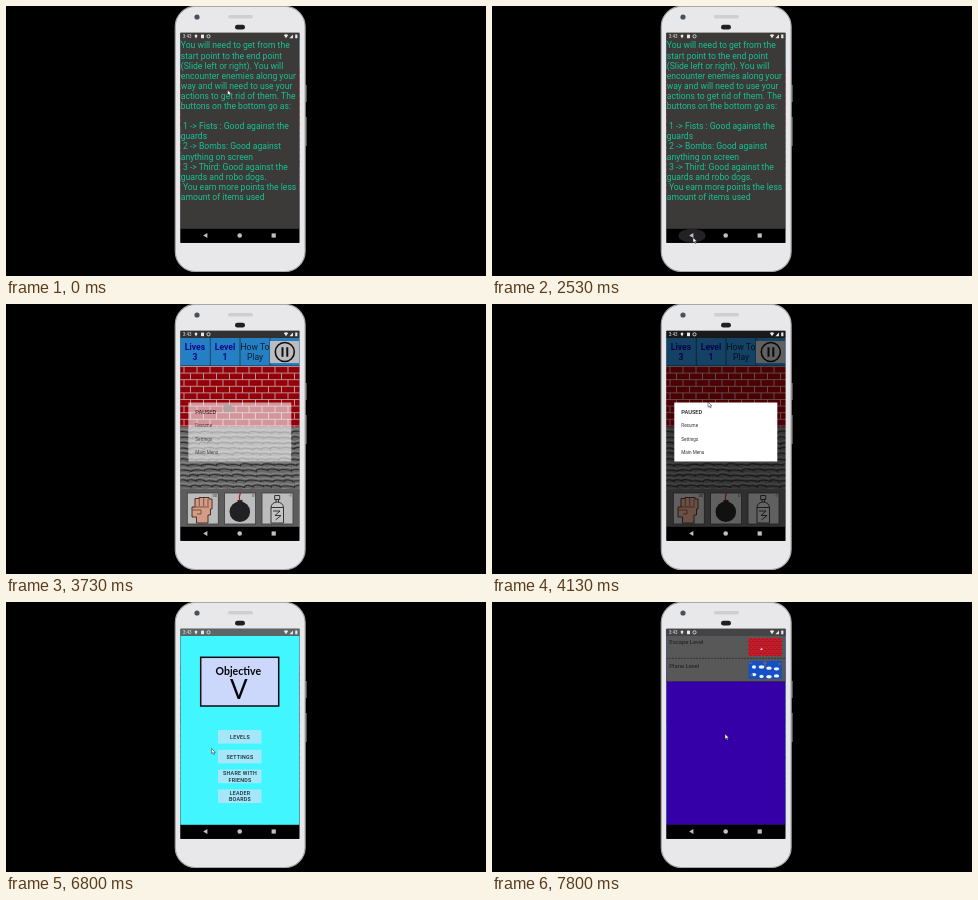
An HTML page that plays this animation: 480x270 px, repeating every 7.99 s.

```html
<!DOCTYPE html>
<html lang="en">
<head>
<meta charset="utf-8">
<title>Phone game walkthrough</title>
<style>
html, body { margin: 0; width: 100%; height: 100%; overflow: hidden; background: #000; }
svg { display: block; width: 100%; height: 100%; }
text { font-family: Roboto, "Open Sans", sans-serif; white-space: pre; }
.mid { text-anchor: middle; }
.bold { font-weight: 700; }
.help { font-size: 8.6px; fill: #14c493; }
.head { font-size: 8.6px; }
.count { font-size: 4px; fill: #333; text-anchor: end; }
.item { font-size: 4.65px; fill: #333; }
.btn { font-size: 5.3px; font-weight: 500; letter-spacing: .05em; fill: #14242c; text-anchor: middle; }
.title { font-family: Lato, sans-serif; text-anchor: middle; fill: #050508; }
.row { font-size: 5.9px; fill: #1c1c1c; }
</style>
</head>
<body>
<svg viewBox="0 0 480 270">
  <defs>
    <clipPath id="screenClip"><rect x="174.5" y="27" width="118.8" height="196"/></clipPath>
    <clipPath id="itemClip"><rect x="182.5" y="141" width="103" height="14"/></clipPath>
    <pattern id="bricks" x="175" y="62" width="13" height="13.2" patternUnits="userSpaceOnUse">
      <rect width="13" height="13.2" fill="#a8000a"/>
      <path d="M0 .5H13M0 7.1H13M3 .5V7.1M9.5 7.1V13.2" stroke="#d8b4b4" stroke-width=".9"/>
    </pattern>
    <pattern id="smallBricks" x="256" y="36" width="4" height="4" patternUnits="userSpaceOnUse">
      <rect width="4" height="4" fill="#b80a1a"/>
      <path d="M0 .2H4M0 2.2H4M1 0V2M3 2V4" stroke="#cc5058" stroke-width=".35"/>
    </pattern>
  </defs>

  <rect width="480" height="270"/>
  <g id="phone">
    <path d="M300 79V96M300 111V140" stroke="#a4a4a8" stroke-width="1"/>
    <rect x="169.3" y=".5" width="129.8" height="265" rx="20" fill="#e8e8ea" stroke="#a8a8ac" stroke-width="1.2"/>
    <rect x="222" y="9" width="25" height="3.4" rx="1.7" fill="#cfcfd2"/>
    <circle cx="191" cy="11" r="2.6" fill="#4a505c"/>
    <rect x="229" y="18.8" width="10" height="4.8" rx="2.4" fill="#202022"/>
    <rect x="174.5" y="26.7" width="118.8" height="210.1"/>
  </g>

  <g clip-path="url(#screenClip)">
    <g id="game">
      <rect x="174" y="27" width="120" height="7" fill="#383838"/>
      <rect x="174" y="34" width="120" height="28" fill="#2a92de"/>
      <path d="M204.3 34V62M234 34V62M264 34V62M174 61.8H294" stroke="#17415f" stroke-width=".8"/>
      <g class="mid head">
        <g class="bold" fill="#1008a0">
          <text x="189" y="46.3">Lives</text><text x="189" y="56.3">3</text>
          <text x="219" y="46.3">Level</text><text x="219" y="56.3">1</text>
        </g>
        <g fill="#0b2036"><text x="249" y="46.3">How To</text><text x="249" y="56.3">Play</text></g>
      </g>
      <rect x="264" y="37" width="29" height="22" fill="#d6d6d8"/>
      <circle cx="278.8" cy="48" r="9.5" fill="none" stroke="#111" stroke-width="1.6"/>
      <path d="M276.5 43.2V52.8M281.3 43.2V52.8" stroke="#111" stroke-width="2"/>
      <rect x="174" y="62" width="120" height="61" fill="url(#bricks)"/>
      <rect x="174" y="123" width="120" height="100" fill="#747474"/>
      <g id="stones" fill="none"></g>
      <rect x="174" y="185" width="120" height="38" fill="#6a6a6a"/>
      <g id="cards"></g>
      <path d="M189 194.5H193V193.500H203V195H206V205H204.500V211H202V219H190.500V213H186V203H189Z" fill="#efb298" stroke="#4a2418" stroke-width=".9"/>
      <path d="M193.300 194V202M197.700 194V202M202 195V202M189 203H203M186.500 206H195V210H191" fill="none" stroke="#7a4432" stroke-width=".8"/>
      <circle cx="233.800" cy="207.800" r="10.300" fill="#262628"/>
      <rect x="231.500" y="196" width="5" height="3" fill="#262628"/>
      <path d="M234 197Q232.500 193.500 234.500 189" fill="none" stroke="#c8202a" stroke-width="1.200"/>
      <path d="M265 219V203.500Q265.500 198.500 271.200 198Q277 198.500 277.500 203.500V219Z" fill="#dedede" stroke="#2a2a2c" stroke-width=".9"/>
      <path d="M268.700 191.500H273.700V195.500H268.700ZM270 195.500V198M272.500 195.500V198M265 203.500H277.500M267 207H274L269 211.500H275L269.500 216" fill="none" stroke="#2a2a2c" stroke-width=".9"/>
      <g class="count"><text x="211" y="193.300">00</text><text x="248.500" y="193.300">0</text><text x="286" y="193.300">-1</text></g>
    </g>

    <rect id="dim" x="174" y="27" width="120" height="196"/>
    <g id="dialog">
      <rect x="182.300" y="98.500" width="103" height="59" fill="#fff"/>
      <circle id="ripple" clip-path="url(#itemClip)" fill="#dedede"/>
      <text x="189.300" y="109.900" font-size="5.700" font-weight="500" fill="#1c1c1c">PAUSED</text>
      <g class="item">
        <text x="189.300" y="122.900">Resume</text>
        <text x="189.300" y="136.500">Settings</text>
        <text x="189.300" y="150.300">Main Menu</text>
      </g>
    </g>

    <g id="help"><rect x="174" y="27" width="120" height="196" fill="#3c3939"/></g>

    <g id="menu">
      <rect x="174" y="27" width="120" height="196" fill="#42f6ff"/>
      <rect x="174" y="27" width="120" height="7" fill="#5c6668"/>
      <rect x="194.700" y="55.300" width="78" height="48.700" fill="#ccd8fb" stroke="#0a0a10" stroke-width="1.500"/>
      <text class="title bold" x="232.300" y="72.500" font-size="10.500">Objective</text>
      <text class="title" x="232.700" y="96.500" font-size="26">V</text>
    </g>

    <g id="levels">
      <rect x="174" y="27" width="120" height="196" fill="#3600a8"/>
      <rect x="174" y="27" width="120" height="7" fill="#444"/>
      <rect x="174" y="34" width="120" height="45.500" fill="#585858"/>
      <path d="M174 56.300H294M174 79.500H294M174 222.500H294" stroke="#25252c" stroke-width=".7" stroke-dasharray="2 1"/>
      <text class="row" x="177.300" y="42.200">Escape Level</text>
      <text class="row" x="177.300" y="65.500">Plane Level</text>
      <rect x="256.500" y="36" width="33.300" height="18" fill="url(#smallBricks)"/>
      <path d="M268 48L269.500 45.500L271 48Z" fill="#c8c8d0"/>
      <rect x="256.500" y="59" width="33.300" height="18" fill="#1450c8"/>
      <g id="clouds" fill="#eef4ff"></g>
      <path d="M271 61H275M273 59V66M257 61H260M286 62H289M258 73H261" stroke="#5c6678" stroke-width="1.300"/>
    </g>
  </g>

  <g id="status" fill="#e8e8e8">
    <text x="176.800" y="32.300" font-size="4.500">3:43</text>
    <path d="M190 28.500A1.400 1.400 0 0 1 191.400 30L190 32.400L188.600 30A1.400 1.400 0 0 1 190 28.500"/>
    <rect x="195" y="28.600" width="3" height="3.600"/>
    <circle cx="202.500" cy="30.300" r="1.600" fill="none" stroke="#ddd" stroke-width=".9"/>
    <path d="M277.800 29Q280 27.500 282.200 29L280 32.300ZM287 28.400V32.300H283.400ZM289.200 28.400H291.400V32.300H289.200Z"/>
  </g>

  <rect x="174.500" y="222.800" width="118.800" height="14"/>
  <ellipse id="press" cx="200" cy="229.700" fill="#222224"/>
  <g fill="#c0c0c0">
    <path d="M197.200 229.500L201.400 227.100V231.900Z"/>
    <circle cx="233.700" cy="229.500" r="2.300"/>
    <rect x="265.600" y="227.400" width="4.200" height="4.200"/>
  </g>
  <ellipse id="smear" cx="222" cy="104" rx="5" ry="3.800" fill="#a8a4a4"/>
  <path id="cursor" d="M0 0V5.200L1.300 4.100L2.200 6L3.100 5.600L2.300 3.800H3.900Z" fill="#fff" stroke="#222" stroke-width=".5"/>
</svg>
<script>
const LOOP = 7990, STEP = 200 / 3;
const $ = id => document.getElementById(id);

function add(parent, tag, attrs, label) {
  const el = document.createElementNS('http://www.w3.org/2000/svg', tag);
  for (const k in attrs) el.setAttribute(k, attrs[k]);
  if (label) el.textContent = label;
  parent.appendChild(el);
  return el;
}

let seed = 7;
const rand = () => (seed = (seed * 16807) % 2147483647) / 2147483647;

function buildHelp() {
  const lines = [
    'You will need to get from the', 'start point to the end point',
    '(Slide left or right). You will', 'encounter enemies along your',
    'way and will need to use your', 'actions to get rid of them. The',
    'buttons on the bottom go as:', '',
    ' 1 -> Fists : Good against the', 'guards', ' 2 -> Bombs: Good against',
    'anything on screen', ' 3 -> Third: Good against the', 'guards and robo dogs.',
    ' You earn more points the less', 'amount of items used'];
  lines.forEach((s, i) =>
    add($('help'), 'text', { class: 'help', x: 174.8, y: 42.4 + i * 10.1 }, s));
}

// Each stone is a lit upper edge over a dark gap
function buildStones() {
  for (let y = 126; y < 186; y += 5.4) {
    for (let x = 170 + rand() * 4; x < 294;) {
      const w = 8 + rand() * 7, top = y + rand() * 1.2;
      const arc = dy => `M${x} ${top + dy}q${w * .15} -1.6 ${w * .5} -1.2t${w * .5} 1.4`;
      add($('stones'), 'path', { d: arc(0), stroke: '#969696', 'stroke-width': 1.3 });
      add($('stones'), 'path', { d: arc(2.3) + 'v-2', stroke: '#363636', 'stroke-width': 1.1 });
      x += w;
    }
  }
}

function buildCards() {
  for (const x of [181.3, 218.6, 256])
    add($('cards'), 'rect', { x, y: 189, width: 31, height: 31, fill: '#d6d6d6', stroke: '#444', 'stroke-width': .8 });
}

function buildMenu() {
  [['LEVELS'], ['SETTINGS'], ['SHARE WITH', 'FRIENDS'], ['LEADER', 'BOARDS']].forEach((words, i) => {
    const mid = 134.8 + i * 19.8;
    add($('menu'), 'rect', { x: 212, y: mid - 6.8, width: 43.5, height: 13.6, fill: '#a4e6fa' });
    words.forEach((s, j) => add($('menu'), 'text',
      { class: 'btn', x: 234, y: mid + 1.9 + (j - (words.length - 1) / 2) * 6.5 }, s));
  });
}

function buildClouds() {
  for (let i = 0; i < 8; i++)
    add($('clouds'), 'ellipse', { cx: 262 + (i % 4) * 7.5, cy: 64 + Math.floor(i / 4) * 8 + rand() * 3, rx: 2 + rand(), ry: 1.7 });
}

const clamp = v => Math.max(0, Math.min(1, v));
const ramp = (t, a, b) => clamp((t - a) / (b - a));
const ease = p => p * p * (3 - 2 * p);

// time, x, y of the pointer tip
const path = [
  [0, 221.5, 84], [800, 209.5, 215], [1333, 205, 226], [1667, 205, 226],
  [2400, 201, 231.5], [2800, 201, 231.5], [3267, 282, 58], [3467, 279, 54],
  [3730, 279, 54], [3733, 220, 100], [4133, 216, 98], [4467, 216, 138],
  [5000, 216, 138], [5800, 205.5, 146.5], [6900, 205.5, 146.5],
  [7333, 233, 132], [LOOP, 233, 132]];

function pointer(t) {
  const i = Math.max(1, path.findIndex(k => k[0] >= t));
  const [a, b] = [path[i - 1], path[i]];
  const p = ease(ramp(t, a[0], b[0]));
  return [a[1] + (b[1] - a[1]) * p, a[2] + (b[2] - a[2]) * p];
}

const set = (id, k, v) => $(id).setAttribute(k, v);

function draw(ms) {
  const t = Math.floor((ms + 5) / STEP) * STEP;
  const [x, y] = pointer(t);
  const smeared = t > 3700 && t < 3790;
  set('cursor', 'transform', `translate(${x} ${y})`);
  set('cursor', 'opacity', smeared ? 0 : 1);
  set('smear', 'opacity', smeared ? .8 : 0);

  const press = ramp(t, 2330, 2530);
  set('press', 'rx', 13.5 * press);
  set('press', 'ry', 7 * press);
  set('press', 'opacity', 1 - ramp(t, 2600, 2850));

  set('help', 'opacity', 1 - ramp(t, 2600, 2850));
  set('dim', 'opacity', .55 * ramp(t, 3667, 3967));
  set('dialog', 'opacity', ramp(t, 3667, 3780));

  const grow = ramp(t, 6170, 6367);
  set('ripple', 'cx', 206 + 28 * ramp(t, 6170, 6333));
  set('ripple', 'cy', 148);
  set('ripple', 'r', 51.5 * grow);

  set('menu', 'opacity', ramp(t, 6667, 6800));
  set('levels', 'opacity', ramp(t, 7667, 7800));
}

buildHelp();
buildStones();
buildCards();
buildMenu();
buildClouds();

const start = performance.now();
function tick() {
  draw((performance.now() - start) % LOOP);
  requestAnimationFrame(tick);
}
draw(0);
tick();
</script>
</body>
</html>
```
